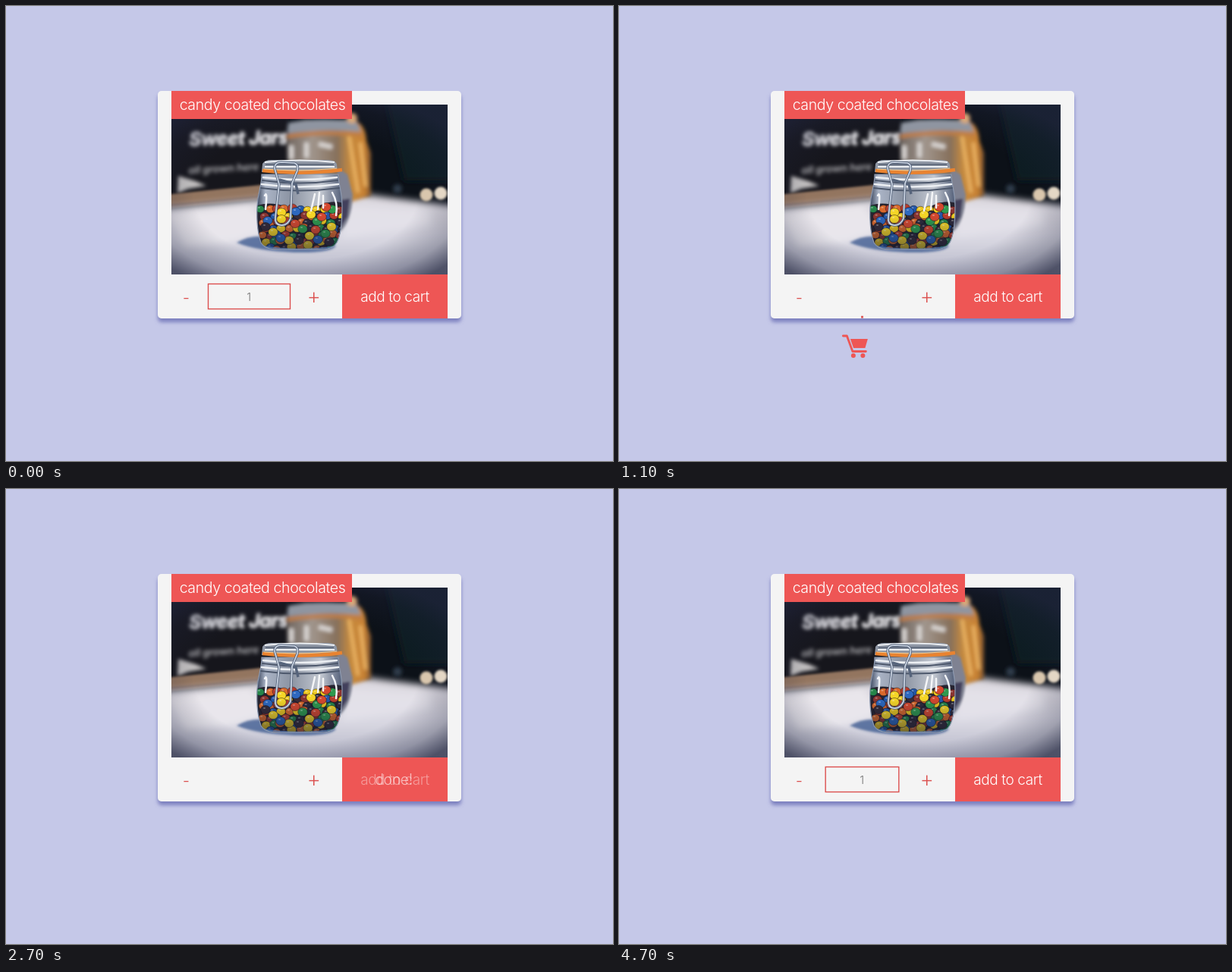
Animation, 800 px wide and 600 px high, one loop 5.7 s. Source, as an HTML page:

```html
<!DOCTYPE html>
<html lang="en">
<head>
<meta charset="utf-8">
<title>Add to cart</title>
<style>
  html, body { margin: 0; width: 100%; height: 100%; overflow: hidden; background: #c5c8e8; }
  svg { display: block; width: 800px; height: 600px; }
  text { font-family: Inter, Roboto, sans-serif; font-weight: 300; letter-spacing: -.02em; text-anchor: middle; }
  .sign { font-family: Roboto, sans-serif; }
  .chalk { font-weight: 700; font-style: italic; fill: #eeedf0; }
</style>
</head>
<body>
<svg viewBox="0 0 800 600">
  <defs>
    <filter id="shadow" x="-10%" y="-10%" width="120%" height="120%">
      <feDropShadow dx="0" dy="5" stdDeviation="2.4" flood-color="#5f62ae" flood-opacity=".7"/>
    </filter>
    <filter id="soft" x="-20%" y="-20%" width="140%" height="140%"><feGaussianBlur stdDeviation="1.8"/></filter>
    <filter id="hazy" x="-20%" y="-20%" width="140%" height="140%"><feGaussianBlur stdDeviation="2.6"/></filter>
    <filter id="softer" x="-30%" y="-30%" width="160%" height="160%"><feGaussianBlur stdDeviation="5"/></filter>
    <linearGradient id="table" x1="0" y1="0" x2="0" y2="1">
      <stop offset="0" stop-color="#dcd8de"/>
      <stop offset=".45" stop-color="#d9d8e2"/>
      <stop offset="1" stop-color="#a2a4ba"/>
    </linearGradient>
    <radialGradient id="vignette" gradientUnits="userSpaceOnUse" cx="0" cy="0" r="1" gradientTransform="translate(395 250) scale(245 140)">
      <stop offset=".6" stop-color="#20243c" stop-opacity="0"/>
      <stop offset=".85" stop-color="#20243c" stop-opacity=".3"/>
      <stop offset="1" stop-color="#20243c" stop-opacity=".7"/>
    </radialGradient>
    <linearGradient id="glass">
      <stop offset="0" stop-color="#39445c"/>
      <stop offset=".1" stop-color="#aab4c6"/>
      <stop offset=".4" stop-color="#8b93a2"/>
      <stop offset=".75" stop-color="#c3c8d1"/>
      <stop offset="1" stop-color="#525e78"/>
    </linearGradient>
    <linearGradient id="jarShade" x1="0" y1="0" x2="0" y2="1">
      <stop offset=".55" stop-color="#141a30" stop-opacity="0"/>
      <stop offset="1" stop-color="#141a30" stop-opacity=".55"/>
    </linearGradient>
    <linearGradient id="backJar">
      <stop offset="0" stop-color="#6f655f"/>
      <stop offset=".3" stop-color="#a0958c"/>
      <stop offset=".6" stop-color="#86705c"/>
      <stop offset=".75" stop-color="#c58a3f"/>
      <stop offset=".92" stop-color="#c98233"/>
      <stop offset="1" stop-color="#7a522f"/>
    </linearGradient>
    <clipPath id="photoArea"><path d="M218 130H582V354H218Z"/></clipPath>
    <path id="jarShape" d="M337 222H438C438 236 443 244 443 264C443 288 441 303 436 312Q431 321 416 321H358Q341 321 336 312C332 301 330 285 331 264C332 244 337 238 337 222Z"/>
    <clipPath id="jarArea"><use href="#jarShape"/></clipPath>
  </defs>

  <rect width="800" height="600" fill="#c5c8e8"/>
  <rect x="200" y="112" width="400" height="300" rx="5" fill="#f4f4f4" filter="url(#shadow)"/>

  <g clip-path="url(#photoArea)">
    <path d="M218 130H582V354H218Z" fill="#0c1118"/>
    <path d="M200 120H372V246L200 268Z" fill="#17181e" filter="url(#soft)"/>
    <g filter="url(#hazy)">
      <text class="chalk" x="307" y="183" font-size="25" stroke="#eeedf0" transform="rotate(-1 307 183)">Sweet Jars</text>
      <text class="chalk" x="287" y="219" font-size="14" opacity=".65" transform="rotate(-3 287 219)">all grown here</text>
      <path d="M227 224L250 231L264 237L240 241L226 247Z" fill="#c5c2c2"/>
    </g>
    <g filter="url(#soft)">
      <path d="M200 250L345 235V254L200 268Z" fill="#93745f"/>
      <path d="M200 265L345 251" stroke="#5d4a44" stroke-width="3"/>
    </g>
    <g filter="url(#softer)">
      <path d="M500 120H600V230H525Z" fill="#0a1b22"/>
      <path d="M200 267L345 253L470 248L600 265V380H200Z" fill="url(#table)"/>
      <path d="M215 276L320 262L350 295L300 312L235 318Z" fill="#f3f1f4" opacity=".6"/>
      <path d="M445 262L560 270V290L445 306Z" fill="#eae8ee" opacity=".6"/>
    </g>
    <path d="M218 130H582V354H218Z" fill="url(#vignette)"/>

    <g filter="url(#hazy)">
      <path d="M370 175Q376 150 396 150H458Q474 156 475 178L481 194V250L455 258H372Z" fill="url(#backJar)"/>
      <path d="M372 154Q410 146 462 152L468 166Q420 160 370 168Z" fill="#8f95a1"/>
      <path d="M370 172Q420 164 470 170" fill="none" stroke="#bf7d45" stroke-width="5"/>
      <path d="M376 184V202M396 180V200M412 182L430 186" stroke="#d8d4d2" stroke-width="6"/>
      <path d="M452 172L464 246M467 180L474 238" stroke="#eeb766" stroke-width="4"/>
      <circle cx="456" cy="148" r="7" fill="#d9a878"/>
      <circle cx="516" cy="241" r="6" fill="#2d3a48"/>
    </g>
    <g filter="url(#soft)">
      <circle cx="554" cy="249" r="8.5" fill="#d9c6ad"/>
      <circle cx="573" cy="247" r="8.5" fill="#e4d7c5"/>
      <path d="M304 312Q320 302 342 304L435 316Q430 326 380 325Q330 323 304 312Z" fill="#36548c" opacity=".75"/>
      <path d="M437 214L450 222L457 249Q456 284 440 298Z" fill="#7f8292"/>
      <path d="M441 256L453 254L450 278L441 292Z" fill="#43415c"/>
    </g>

    <use href="#jarShape" fill="url(#glass)"/>
    <g clip-path="url(#jarArea)">
      <path d="M325 266Q343 256 368 264T413 263T450 262V330H325Z" fill="#262431"/>
      <g id="candies" stroke="#0b0d1a" stroke-opacity=".45"></g>
      <use href="#jarShape" fill="url(#jarShade)"/>
      <path d="M336 317Q387 325 438 317" fill="none" stroke="#5b7fb8" stroke-width="2.5" opacity=".7"/>
    </g>
    <g fill="none" stroke-linecap="round">
      <use href="#jarShape" stroke="#8d9ab0" stroke-width="1.2"/>
      <path d="M339 226Q387 232 436 226M337 235Q387 242 438 235" stroke="#eceff3" stroke-width="2.5"/>
      <path d="M338 230Q387 237 437 230M336 240Q387 247 439 240" stroke="#4d586c" stroke-width="1.8"/>
      <path d="M341 250Q345 242 342 268M430 246Q438 260 435 276" stroke="#f2f4f8" stroke-width="2.5"/>
      <path d="M407 248L402 270M413 246L411 268M418 250V266" stroke="#f4f5f7" stroke-width="2.5"/>
    </g>
    <path d="M338 208Q341 203 350 203H424Q435 203 436 209L437 219H337Z" fill="#8f97a5"/>
    <path d="M341 206Q387 201 433 206M341 212H433" fill="none" stroke="#eef1f5" stroke-width="2.2"/>
    <path d="M342 209H432" stroke="#566074" stroke-width="1.3"/>
    <path d="M338 217Q387 223 443 216" fill="none" stroke="#e98330" stroke-width="4.5"/>
    <path d="M340 215Q385 219 436 214" fill="none" stroke="#f9c37e" stroke-width="1.2"/>
    <g fill="none">
      <path id="clasp" d="M354 214Q354 206 363 206L380 207Q386 209 384 217L377 234L375 280Q371 290 362 289Q354 288 355 279L360 235L354 214M360 229L382 235L385 248" stroke="#56647b" stroke-width="3.4"/>
      <path d="M354 214Q354 206 363 206L380 207Q386 209 384 217L377 234L375 280Q371 290 362 289Q354 288 355 279L360 235L354 214" stroke="#ccd5e3" stroke-width="1.7"/>
    </g>
  </g>

  <rect x="218" y="112" width="238" height="37" fill="#ee5655"/>
  <text x="338" y="137" font-size="19.5" fill="#fff">candy coated chocolates</text>

  <rect x="443" y="354" width="139" height="58" fill="#ee5655"/>
  <text id="add" x="512.5" y="390" font-size="19" fill="#fff">add to cart</text>
  <text id="done" x="511" y="390" font-size="19.5" fill="#fff">done!</text>

  <g fill="#dc504f" font-size="26">
    <text class="sign" x="237.3" y="394">-</text>
    <text class="sign" x="405.7" y="392.5">+</text>
  </g>
  <text id="count" x="320" y="389" font-size="15" fill="#777">1</text>
  <rect id="field" fill="none" stroke="#dc504f" stroke-width="1.4"/>

  <g id="cart" fill="#ee5655">
    <path d="M1.5 2H6.5L14 22.5H31.5" fill="none" stroke="#ee5655" stroke-width="2.8" stroke-linecap="round" stroke-linejoin="round"/>
    <path d="M11 6H34L30.5 18H15.2Z"/>
    <circle cx="15" cy="28" r="3"/>
    <circle cx="27.5" cy="28" r="3"/>
  </g>
</svg>
<script>
const $ = id => document.getElementById(id);
const LOOP = 5700, LAST_STEP = 4700, STEP = 100;

function fillJar() {
  const colors = ['#edc81f', '#b83c2c', '#26854a', '#2457a8', '#d9692c', '#3a2c38', '#2d2a3c', '#8a3430'];
  let seed = 11;
  const random = () => (seed = seed * 16807 % 2147483647) / 2147483647;
  const candy = (x, y, color, r) => `<ellipse cx="${x}" cy="${y}" rx="${r}" ry="${r * .88}" fill="${color}"/>` +
    `<ellipse cx="${x - 1.5}" cy="${y - 2}" rx="1.6" ry=".9" fill="#fff" stroke="none" opacity=".35"/>`;
  let shapes = '';
  for (let row = 0; row < 7; row++)
    for (let col = 0; col < 11; col++)
      shapes += candy(335 + col * 10.2 + row % 2 * 5 + random() * 4, 266 + row * 8.5 + random() * 4,
        colors[Math.floor(random() * colors.length)], 5.4 + random());
  const front = {
    '#f5d527': [[363, 272], [402, 275], [352, 298], [373, 309], [400, 303], [429, 291], [398, 315], [363, 281]],
    '#2f994e': [[391, 294], [410, 284], [421, 300], [430, 268]],
    '#2d68bf': [[382, 271], [362, 306], [411, 308], [345, 283]],
    '#d4482f': [[416, 278], [381, 287], [408, 295], [422, 265]],
    '#352b38': [[386, 309], [426, 311], [342, 291]]
  };
  for (const color in front)
    for (const [x, y] of front[color]) shapes += candy(x, y, color, 6.3);
  $('candies').innerHTML = shapes;
}

const progress = (t, from, to) => Math.min(1, Math.max(0, (t - from) / (to - from)));
const easeInOut = p => p < .5 ? 2 * p * p : 1 - 2 * (1 - p) ** 2;
const eased = (t, from, to) => easeInOut(progress(t, from, to));
const mix = (a, b, p) => a + (b - a) * p;
const set = (id, attributes) => {
  for (const name in attributes) $(id).setAttribute(name, attributes[name]);
};

function draw(t) {
  // The quantity field collapses to a dot, drops into the cart and later reopens.
  const reopening = t >= 4300;
  const width = reopening ? mix(1.4, 108, eased(t, 4300, 4820)) : mix(108, 1.4, eased(t, 0, 600));
  const height = reopening ? 33 : mix(33, 1.4, eased(t, 500, 900));
  const drop = reopening ? 0 : 61 * progress(t, 900, 1200) ** 2;
  set('field', {
    x: 320.5 - width / 2, y: 383 + drop - height / 2, width, height,
    opacity: t < 1300 || t > 4300 ? 1 : 0
  });
  set('count', { opacity: reopening ? progress(t, 4400, 4700) : 1 - progress(t, 0, 400) });

  const cartX = 197 + 101 * eased(t, 500, 1200) + 153 * eased(t, 1700, 2400);
  set('cart', {
    transform: `translate(${cartX} 433)`,
    opacity: progress(t, 500, 900) * (1 - progress(t, 1700, 2400))
  });

  const done = progress(t, 2400, 2900) * (1 - progress(t, 4000, 4500));
  set('done', { opacity: done });
  set('add', { opacity: 1 - done });
}

function tick() {
  const t = performance.now() % LOOP;
  draw(Math.min(LAST_STEP, Math.floor(t / STEP) * STEP));
  requestAnimationFrame(tick);
}

fillJar();
tick();
</script>
</body>
</html>
```
